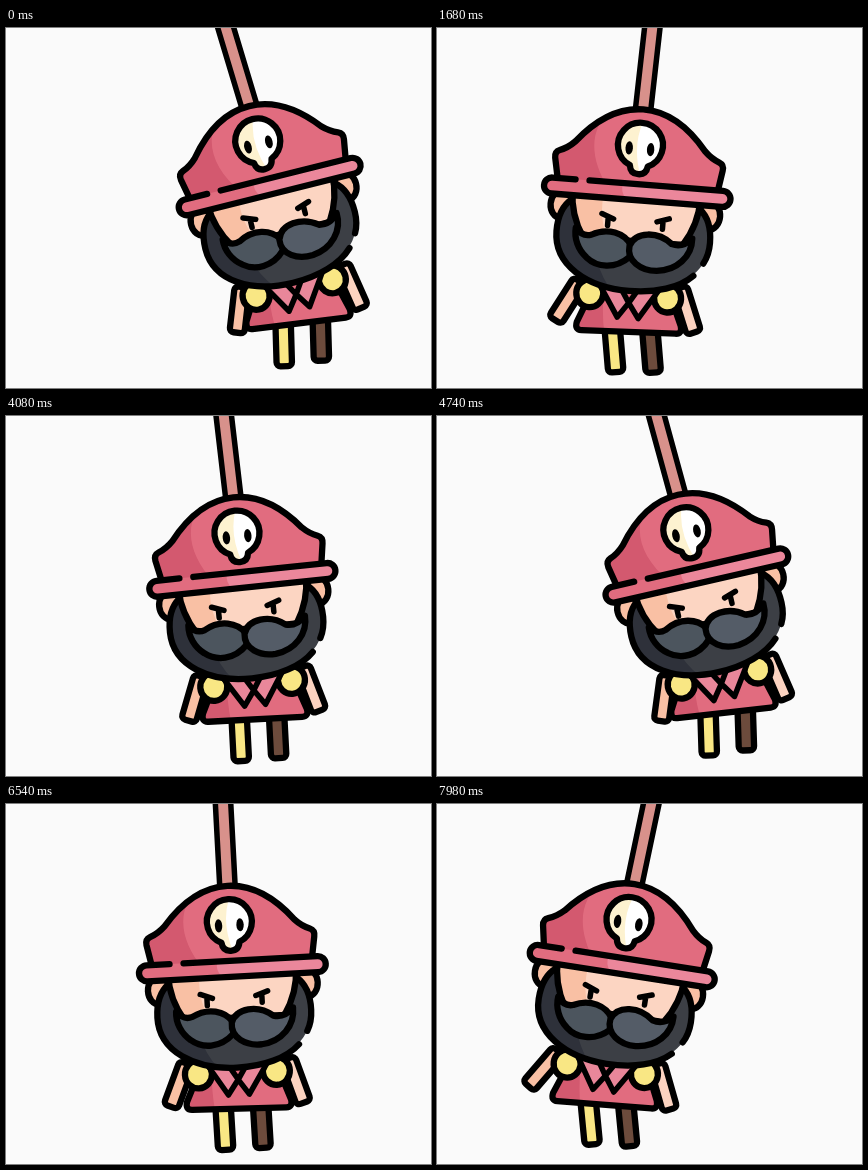
These frames come from a looping animation (425x360 px, 8000 ms). An HTML page:

```html
<!DOCTYPE html>
<html lang="en">
<head>
<meta charset="utf-8">
<title>Swinging pirate puppet</title>
<style>
  html, body { margin: 0; width: 100%; height: 100%; overflow: hidden; background: #fafafa; }
  svg { display: block; width: 425px; height: 360px; }
  .ink { stroke: #000; stroke-width: 6.3; stroke-linecap: round; stroke-linejoin: round; }
  .line { fill: none; }
</style>
</head>
<body>
<svg viewBox="0 0 425 360">
  <defs>
    <path id="hatShape" d="M-79 84 L-84 59 Q-85 53 -80 51 Q-72 48 -65 41 Q-35 4 0 4 Q35 4 65 41 Q72 48 80 51 Q85 53 84 59 L80 84Z"/>
    <path id="faceShape" d="M-64 90 C-64 108 -59 122 -50 136 L50 136 C59 122 64 108 64 90Z"/>
    <path id="beardShape" d="M-64 99 C-73 106 -77 118 -77 132 C-77 166 -42 186 0 186 C42 186 77 166 77 132 C77 118 73 106 64 99Z"/>
    <path id="skullShape" d="M-9 60.5 A22.5 22.5 0 1 1 9 60.5 Q8 69 0 69 Q-8 69 -9 60.5Z"/>
    <path id="torsoShape" d="M-38 -12 L-44 18 L-51 34 Q-53 42 -46 42 L48 42 Q55 42 53 34 L46 16 L38 -12Z"/>
    <path id="leftLobe" d="M-58 127 Q-51 136 -42 133 C-26 124 -9 129 -2 140 L-2 152 C-16 166 -34 165 -45 156 C-54 149 -59 138 -58 127Z"/>
    <path id="rightLobe" d="M59 129 Q50 139 39 136 C24 124 2 126 -3 141 C-5 156 10 165 26 164 C46 162 60 147 59 129Z"/>
    <clipPath id="hatClip"><use href="#hatShape"/></clipPath>
    <clipPath id="faceClip"><use href="#faceShape"/></clipPath>
    <clipPath id="beardClip"><use href="#beardShape"/></clipPath>
    <clipPath id="skullClip"><use href="#skullShape"/></clipPath>
    <clipPath id="torsoClip"><use href="#torsoShape"/></clipPath>
  </defs>

  <g id="rope">
    <rect class="ink" style="stroke-width:5.5" x="-7.7" y="-40" width="15.4" height="140" fill="#d8918b"/>
  </g>

  <g id="arms">
    <g id="armLeft"><rect class="ink" x="-7.5" y="-7" width="15" height="46" rx="4" fill="#f9c0a4"/></g>
    <g id="armRight"><rect class="ink" x="-7.5" y="-7" width="15" height="47" rx="4" fill="#fcd3c0"/></g>
  </g>

  <g id="torso">
    <g id="legLeft"><rect class="ink" x="-7.7" y="-8" width="15.4" height="49" rx="4" fill="#f9e784"/></g>
    <g id="legRight"><rect class="ink" x="-7.7" y="-8" width="15.4" height="49" rx="4" fill="#6c4b3c"/></g>
    <use href="#torsoShape" fill="#e16c7f"/>
    <path clip-path="url(#torsoClip)" d="M-60 -15 H-24 Q-28 20 -22 50 H-60Z" fill="#d3596f"/>
    <use href="#torsoShape" class="ink line"/>
  </g>

  <g id="chest">
    <ellipse class="ink" cx="-39" cy="6" rx="13.5" ry="14" fill="#f9e784"/>
    <ellipse class="ink" cx="39" cy="6" rx="13.5" ry="14" fill="#f9e784"/>
    <path class="ink" style="stroke-width:5.5" d="M-29 -2 L-10 28 L.5 13 L-10 -4Z M30 -2 L11 28 L.5 13 L11 -4Z" fill="#e9879a"/>
  </g>

  <g id="head">
    <ellipse class="ink" cx="-74" cy="105" rx="11" ry="14" fill="#f9c0a4"/>
    <ellipse class="ink" cx="74" cy="105" rx="11" ry="14" fill="#f9c0a4"/>

    <use href="#beardShape" fill="#3c3f45"/>
    <path clip-path="url(#beardClip)" d="M-80 90 H-44 Q-43 165 -14 190 H-80Z" fill="#2e313a"/>
    <path class="ink line" d="M-64 99 C-73 106 -77 118 -77 132 C-77 166 -42 186 0 186 C27 186 50 179 63 166"/>
    <path class="ink line" d="M72 153 Q77 144 77 132 C77 118 73 106 64 99"/>

    <use href="#faceShape" fill="#fcd5c2"/>
    <path clip-path="url(#faceClip)" d="M-70 88 H-32 Q-37 112 -25 138 H-70Z" fill="#f9c0a4"/>
    <use href="#faceShape" class="ink line"/>
    <path class="ink line" style="stroke-width:5.5" d="M-33 111 L-21 115.5 M-26.5 116 V122.5 M22.5 115 L34.5 111 M28.5 115 V122"/>

    <use href="#leftLobe" class="ink" fill="#4c555e"/>
    <use href="#rightLobe" class="ink" fill="#545c67"/>

    <use href="#hatShape" fill="#e16c7f"/>
    <path clip-path="url(#hatClip)" d="M-95 0 H-22 C-52 18 -54 52 -28 86 H-95Z" fill="#d3596f"/>
    <use href="#hatShape" class="ink line"/>

    <rect x="-93" y="79" width="187" height="16" rx="8" fill="#e16c7f"/>
    <path d="M-14 79 H86 A8 8 0 0 1 86 95 H-10 Q-17 87 -14 79Z" fill="#eb879b"/>
    <path class="ink line" d="M-62 79 H-85 A8 8 0 0 0 -85 95 H86 A8 8 0 0 0 86 79 H-48"/>

    <use href="#skullShape" fill="#fff"/>
    <path clip-path="url(#skullClip)" d="M-26 14 H2 Q-9 40 3 72 H-26Z" fill="#fdf2d0"/>
    <use href="#skullShape" class="ink line"/>
    <ellipse cx="-11" cy="43.5" rx="3.7" ry="6.6"/>
    <ellipse cx="10.5" cy="43.5" rx="3.7" ry="6.6"/>
  </g>
</svg>
<script>
  const LOOP = 8000, STEP = 60, PERIOD = 5420, LEFT_PEAK = 2500;
  const PIVOT = { x: 216.5, y: -11 }, ROPE = 89, NECK = 185;
  const rad = deg => deg * Math.PI / 180;
  const ids = ['rope', 'head', 'arms', 'torso', 'chest', 'legLeft', 'legRight', 'armLeft', 'armRight'];
  const parts = Object.fromEntries(ids.map(id => [id, document.getElementById(id)]));

  function place(id, { x, y }, angle) {
    parts[id].setAttribute('transform', `translate(${x} ${y}) rotate(${angle})`);
  }

  // Point at a distance along a link hanging at the given angle.
  function hang(from, length, angle) {
    return { x: from.x - length * Math.sin(rad(angle)), y: from.y + length * Math.cos(rad(angle)) };
  }

  // Sine swing, slightly steeper through the middle.
  function swing(time) {
    const phase = 2 * Math.PI * (time - LEFT_PEAK) / PERIOD;
    return -2.7 + 11.6 * (1.025 * Math.cos(phase) - 0.025 * Math.cos(3 * phase));
  }

  // The bend fades from the rope down to the legs.
  function pose(time) {
    const head = swing(time);
    const rope = head * 1.25 + 0.8, chest = head * 0.87, torso = head * 0.5;
    const top = hang(PIVOT, ROPE, rope);
    const neck = hang(top, NECK, head);
    const leg = -4 - 0.17 * head - torso;
    place('rope', PIVOT, rope);
    place('head', top, head);
    place('arms', neck, chest);
    place('chest', neck, chest);
    place('torso', neck, torso);
    place('legLeft', { x: -15, y: 42 }, leg);
    place('legRight', { x: 22.5, y: 41 }, leg);
    place('armLeft', { x: -53, y: 1 }, 25 + 1.6 * head + 0.02 * head * head - chest);
    place('armRight', { x: 53, y: 1 }, -19 + 0.35 * head - chest);
  }

  const start = performance.now();
  function frame() {
    const time = Math.max(0, performance.now() - start) % LOOP;
    pose(Math.floor(time / STEP) * STEP);
    requestAnimationFrame(frame);
  }
  frame();
</script>
</body>
</html>
```
